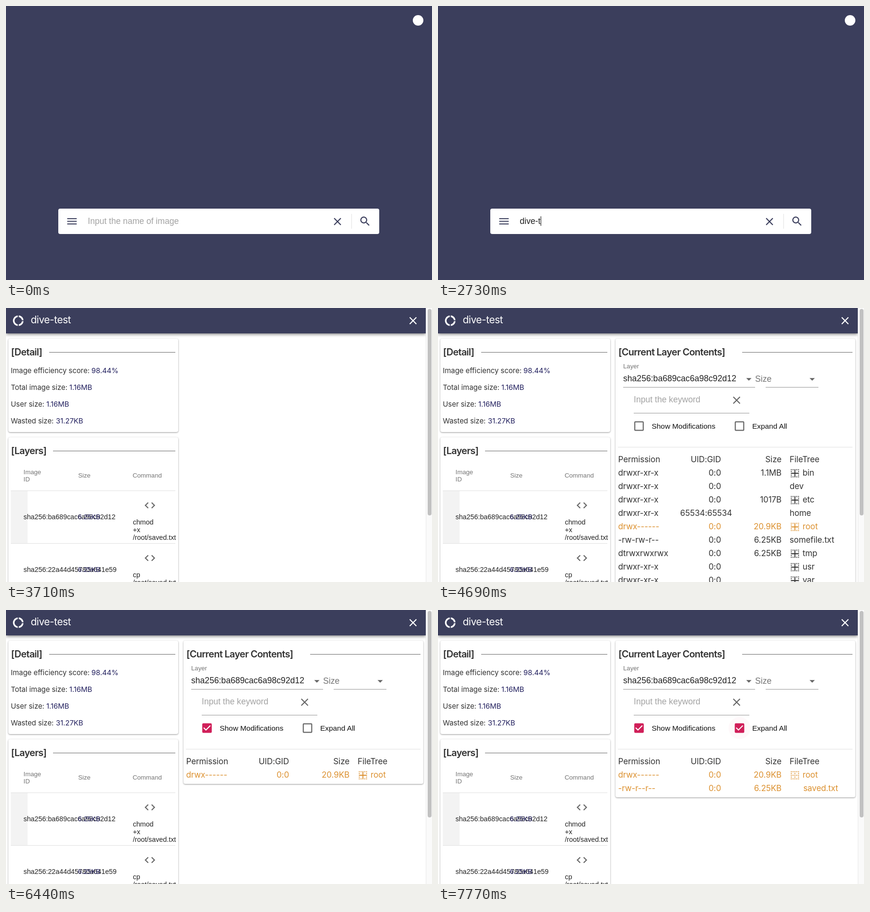
Animation, 888 px wide and 572 px high, one loop 8 s. Source, as an HTML page:

```html
<!DOCTYPE html>
<html lang="en">
<head>
<meta charset="utf-8">
<title>Image explorer</title>
<style>
html, body { margin: 0; width: 100%; height: 100%; overflow: hidden; background: #fff; }
svg { display: block; width: 888px; height: 572px; }
text { white-space: pre; font-family: "Liberation Sans", Arial, sans-serif; }
.ui { font-family: Inter, sans-serif; }
.head { font-size: 20px; font-weight: 600; letter-spacing: -.75px; fill: #333; }
.body { font-size: 15px; letter-spacing: -.05px; fill: #333; }
.cell { font-size: 17px; letter-spacing: -.1px; }
.card { fill: #fff; filter: drop-shadow(0 1px 1.5px rgba(0, 0, 0, .42)); }
</style>
</head>
<body>
<svg id="stage" viewBox="0 0 888 572"></svg>
<script>
const LOOP = 8000, QUERY = "dive-test";
const TYPE_START = 1820, TYPE_STEP = 166;
const LOAD = 3430, OPEN = 3710, CONTENTS = 3850, MODIFIED = 5810, EXPANDED = 7280;
const NAVY = "#3b3e5c", ORANGE = "#dc9130", PINK = "#d01f59", INK = "#222";

const ICON = {
  menu: "M3 18h18v-2H3v2zm0-5h18v-2H3v2zm0-7v2h18V6H3z",
  close: "M19 6.41 17.59 5 12 10.59 6.41 5 5 6.41 10.59 12 5 17.59 6.41 19 12 13.41 17.59 19 19 17.59 13.41 12z",
  search: "M15.5 14h-.79l-.28-.27A6.5 6.5 0 1 0 13.73 14.43l.27.28v.79l5 4.99L20.49 19zm-6 0a4.5 4.5 0 1 1 0-9 4.5 4.5 0 0 1 0 9z",
  ring: "M11 5.08V2c-5 .5-9 4.81-9 10s4 9.5 9 10v-3.08c-3-.48-6-3.4-6-6.92s3-6.44 6-6.92zM18.97 11H22c-.47-5-4-8.53-9-9v3.08c3 .43 5.54 2.92 5.97 5.92zM13 18.92V22c5-.47 8.53-4 9-9h-3.03c-.43 3-2.97 5.49-5.97 5.92z",
  code: "M9.4 16.6 4.8 12l4.6-4.6L8 6l-6 6 6 6zm5.2 0 4.6-4.6-4.6-4.6L16 6l6 6-6 6z",
  arrow: "M7 10l5 5 5-5z",
  box: "M19 5v14H5V5h14m0-2H5a2 2 0 0 0-2 2v14a2 2 0 0 0 2 2h14a2 2 0 0 0 2-2V5a2 2 0 0 0-2-2z",
  checked: "M19 3H5a2 2 0 0 0-2 2v14a2 2 0 0 0 2 2h14a2 2 0 0 0 2-2V5a2 2 0 0 0-2-2zm-9 14-5-5 1.41-1.41L10 14.17l7.59-7.59L19 8z",
  folder: dots(false) + "M3 11h18v2H3zM11 3h2v18h-2z",
  opened: dots(true)
};

function dots(inner) {
  let d = "";
  for (let i = 0; i < 5; i++) for (let j = 0; j < 5; j++) {
    const edge = i % 4 === 0 || j % 4 === 0;
    if (edge || inner && (i === 2 || j === 2)) d += `M${3 + 4 * i} ${3 + 4 * j}h2v2h-2z`;
  }
  return d;
}

const icon = (name, x, y, fill = "#666", scale = 1.1) =>
  `<path d="${ICON[name]}" fill="${fill}" transform="translate(${x} ${y}) scale(${scale}) translate(-12 -12)"/>`;
const text = (x, y, s, size, fill = INK, attrs = "") =>
  `<text x="${x}" y="${y}" font-size="${size}" fill="${fill}" ${attrs}>${s}</text>`;
const ui = (x, y, s, type, attrs = "") => `<text class="ui ${type}" x="${x}" y="${y}" ${attrs}>${s}</text>`;
const rect = (x, y, w, h, fill, attrs = "") =>
  `<rect x="${x}" y="${y}" width="${w}" height="${h}" fill="${fill}" ${attrs}/>`;
const rule = (x1, x2, y, fill) => rect(x1, y, x2 - x1, 1, fill);
const card = (x, y, w, h, id = "") => `<rect ${id} class="card" x="${x}" y="${y}" width="${w}" height="${h}" rx="4"/>`;
const title = (x, s, y, from, to) => ui(x, y + 6.5, s, "head") + rule(from, to, y, "#666");

function searchPage() {
  return rect(0, 0, 888, 572, NAVY)
    + `<circle cx="859" cy="30" r="11" fill="#fff"/>`
    + rect(109, 423, 669, 53, "#fff", 'rx="4"')
    + icon("menu", 137.5, 449.5, NAVY) + icon("close", 691, 450, NAVY)
    + rect(720, 434, 1, 31, "#e0e0e0") + icon("search", 748.5, 449.5, NAVY)
    + text(170.5, 455, "", 17.6, INK, 'id="query"')
    + rect(0, 439, 1, 20, "#000", 'id="caret"')
    + `<g id="loading">`
    + ui(444.5, 515, "Loading...", "", 'text-anchor="middle" font-size="20" font-weight="500" letter-spacing=".15" fill="#fff"')
    + rect(109, 538, 671, 5, "#c6c9e6") + `</g>`;
}

function details() {
  const facts = [["Image efficiency score:", "98.44%", 178], ["Total image size:", "1.16MB", 132],
    ["User size:", "1.16MB", 84], ["Wasted size:", "31.27KB", 104]];
  return card(5, 64, 354, 195) + title(10.5, "[Detail]", 92, 90, 353)
    + facts.map(([name, value, x], i) => ui(10, 136 + 35 * i, name, "body")
      + ui(x, 136 + 35 * i, value, "body", 'style="fill:#23215f"')).join("");
}

function layer(y, id, lines) {
  return text(36.5, y + 60, "sha256:" + id, 14.3) + text(150, y + 60, "6.25KB", 14.3, "#23215f")
    + icon("code", 300, y + 31)
    + lines.map((s, i) => text(264.5, y + 71 + 16 * i, s, 14.3)).join("");
}

function layers() {
  const head = (x, y, s) => text(x, y, s, 13.2, "#757575");
  return card(5, 270, 354, 330) + title(10.5, "[Layers]", 298, 98, 353)
    + head(36.5, 347, "Image") + head(36.5, 362, "ID") + head(150.5, 354, "Size") + head(264, 354, "Command")
    + rect(10, 382, 35, 109, "#f3f3f3") + rule(10, 353, 381, "#e0e0e0") + rule(10, 353, 491, "#e0e0e0")
    + layer(381, "ba689cac6a98c92d12", ["chmod", "+x", "/root/saved.txt"])
    + layer(491, "22a44d45780a641e59", ["cp", "/root/saved.txt"]);
}

function contents() {
  const check = (x, id) => `<g id="${id}"></g><circle id="${id}Ripple" cx="${x}" cy="246.5" fill="${PINK}"/>`;
  return card(370, 64, 500, 540, 'id="panel"') + title(376, "[Current Layer Contents]", 92, 634, 864)
    + text(386, 126, "Layer", 13.2, "#757575") + text(386, 153, "sha256:ba689cac6a98c92d12", 17.6)
    + icon("arrow", 648, 148.5) + rule(386, 661, 165, "#949494")
    + text(661, 154, "Size", 17.6, "#757575") + icon("arrow", 780, 148.5) + rule(683, 793, 165, "#949494")
    + text(408, 197, "Input the keyword", 17.6, "#a3a3a3") + icon("close", 622.5, 192.5) + rule(408, 649, 219, "#949494")
    + check(419, "mods") + text(445.5, 252, "Show Modifications", 15.4, "#111")
    + check(628.5, "all") + text(655, 252, "Expand All", 15.4, "#111")
    + rule(375, 864, 290, "#e0e0e0") + `<g id="files"></g>`;
}

// Each entry: permission, owner, size, name, icon, highlighted
const HEADER = ["Permission", "UID:GID", "Size", "FileTree"];
const DIR = "drwxr-xr-x", OWN = "0:0";
const ROOT = ["drwx------", OWN, "20.9KB", "root", "folder", true];
const LISTS = [
  [HEADER, [DIR, OWN, "1.1MB", "bin", "folder"], [DIR, OWN, "", "dev"], [DIR, OWN, "1017B", "etc", "folder"],
    [DIR, "65534:65534", "", "home"], ROOT, ["-rw-rw-r--", OWN, "6.25KB", "somefile.txt"],
    ["dtrwxrwxrwx", OWN, "6.25KB", "tmp", "folder"], [DIR, OWN, "", "usr", "folder"], [DIR, OWN, "", "var", "folder"]],
  [HEADER, ROOT],
  [HEADER, [...ROOT.slice(0, 4), "opened", true], ["-rw-r--r--", OWN, "6.25KB", "saved.txt", "", true]]
];

function fileRow([mode, owner, size, name, glyph, hot], i) {
  const y = 316 + 28 * i, fill = hot ? ORANGE : "#333";
  const cell = (x, s, anchor = "start") => ui(x, y + 6, s, "cell", `fill="${fill}" text-anchor="${anchor}"`);
  const nameX = glyph ? 760 : hot ? 761.5 : 733;
  return cell(375.5, mode) + cell(owner.length > 7 ? 613 : 590, owner, "end") + cell(716, size, "end")
    + (glyph ? icon(glyph, 744, y + 1, fill, .94) : "") + cell(nameX, name);
}

const $ = id => document.getElementById(id);
$("stage").innerHTML = `<g id="search">${searchPage()}</g><g id="result">`
  + rect(0, 0, 888, 572, "#fff") + details() + layers() + `<g id="contents">${contents()}</g>`
  + rect(0, 0, 875, 53, NAVY, 'style="filter:drop-shadow(0 2px 3px rgba(0,0,0,.5))"')
  + icon("ring", 25.5, 26.5, "#fff")
  + ui(51.5, 32, QUERY, "", 'font-size="21" letter-spacing="-.5" fill="#fff"')
  + icon("close", 848.5, 26.5, "#fff")
  + rect(875, 0, 13, 572, "#fafafa") + rect(875, 0, 1, 572, "#e8e8e8")
  + rect(879, 2, 8, 431, "#c1c1c1", 'rx="4"') + `</g>`;

const show = (id, on) => $(id).setAttribute("display", on ? "inline" : "none");

function ripple(id, age) {
  const p = Math.min(1, Math.max(0, age / 550));
  $(id).setAttribute("r", 23 * (1 - (1 - p) ** 3));
  $(id).setAttribute("opacity", age < 0 ? 0 : .25 * (1 - p));
}

let drawn = -1;
function setFiles(state) {
  if (state === drawn) return;
  drawn = state;
  const box = (x, on) => icon(on ? "checked" : "box", x, 246.5, on ? PINK : "#666");
  $("files").innerHTML = LISTS[state].map(fileRow).join("");
  $("mods").innerHTML = box(419, state > 0);
  $("all").innerHTML = box(628.5, state > 1);
  $("panel").setAttribute("height", [540, 299, 327][state]);
}

function draw(now) {
  const t = now % LOOP;
  show("search", t < OPEN);
  show("result", t >= OPEN);
  if (t < OPEN) {
    const typed = QUERY.slice(0, Math.max(0, Math.floor((t - TYPE_START) / TYPE_STEP) + 1));
    const query = $("query");
    query.textContent = typed || "Input the name of image";
    query.setAttribute("fill", typed ? INK : "#a3a3a3");
    show("caret", typed);
    $("caret").setAttribute("x", Math.round(170.5 + query.getComputedTextLength()));
    show("loading", t >= LOAD);
  } else {
    show("contents", t >= CONTENTS);
    setFiles(t >= EXPANDED + 70 ? 2 : t >= MODIFIED + 70 ? 1 : 0);
    ripple("modsRipple", t - MODIFIED);
    ripple("allRipple", t - EXPANDED);
  }
  requestAnimationFrame(() => draw(performance.now() - start));
}
const start = performance.now();
draw(0);
</script>
</body>
</html>
```
